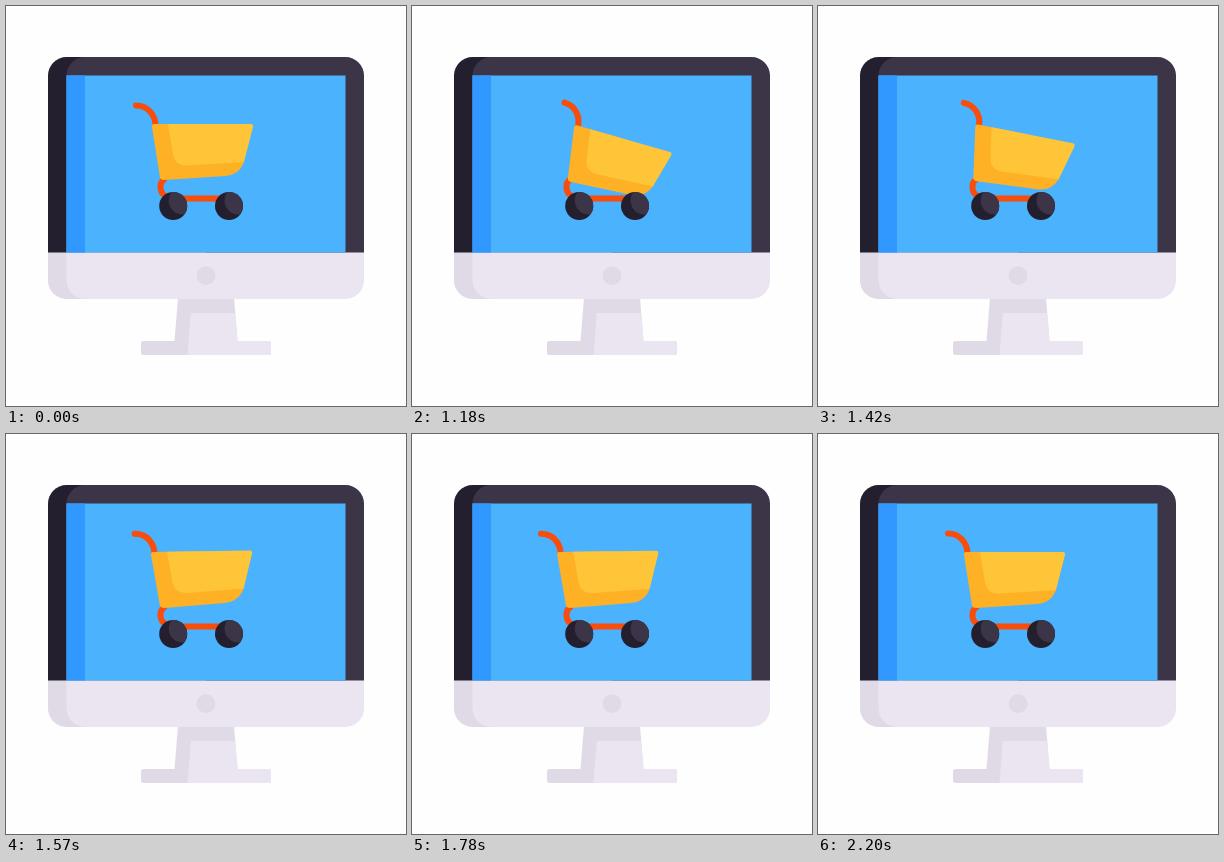
An HTML page for the animation above (2.23 s loop, 400 px wide and 400 px high).

```html
<!DOCTYPE html>
<html lang="en">
<head>
<meta charset="utf-8">
<title>Shopping cart</title>
<style>
  html, body { margin: 0; width: 100%; height: 100%; overflow: hidden; background: #fefefe; }
  svg { display: block; width: 100vw; height: 100vh; }
</style>
</head>
<body>
<svg viewBox="0 0 400 400">
  <defs>
    <clipPath id="rim"><circle r="14"/></clipPath>
    <g id="wheel">
      <circle r="14" fill="#241f2e"/>
      <circle cx="9.5" cy="-5.5" r="14" fill="#3c3548" clip-path="url(#rim)"/>
    </g>
  </defs>

  <!-- stand -->
  <path fill="#e0d9e6" d="M172 292H228L231.5 335H262.5Q265 335 265 337.5V346.500Q265 349 262.500 349H137.500Q135 349 135 346.500V337.500Q135 335 137.500 335H168.500Z"/>
  <path fill="#ebe5f1" d="M184.800 307H229.200L231.500 335H262.500Q265 335 265 337.500V346.500Q265 349 262.500 349H181.500Z"/>

  <!-- housing -->
  <path fill="#241f2e" d="M42 247V69.500A18.500 18.500 0 0 1 60.500 51H200V247Z"/>
  <path fill="#3c3548" d="M60.500 247V69.500A18.500 18.500 0 0 1 79 51H339.500A18.500 18.500 0 0 1 358 69.500V247Z"/>
  <path fill="#e0d9e6" d="M42 246.500H200V293H60.500A18.500 18.500 0 0 1 42 274.500Z"/>
  <path fill="#ebe5f1" d="M60.500 246.500H358V274.500A18.500 18.500 0 0 1 339.500 293H79A18.500 18.500 0 0 1 60.500 274.500Z"/>
  <circle cx="200" cy="269.700" r="9.400" fill="#e0d9e6"/>

  <!-- screen -->
  <path fill="#4bb2fe" d="M60.500 69.500H339.500V246.500H60.500Z"/>
  <path fill="#3198ff" d="M60.500 69.500H79V246.500H60.500Z"/>

  <!-- cart -->
  <g fill="none" stroke="#f84d0b" stroke-width="6" stroke-linecap="round">
    <path d="M158 173.500C153 177 153 187 160 190Q164 192.500 170 192.500H215"/>
  </g>
  <g id="basket">
    <path fill="none" stroke="#f84d0b" stroke-width="6" stroke-linecap="round" d="M130 99.500C142 99.500 149 109 149.500 119"/>
    <path fill="#ffb125" d="M148 118H200L238 156Q233 169 219 170L158 174Q154.500 174 154 171.500L146 121Q145.700 118 148 118Z"/>
    <path fill="#ffc539" d="M162 118H245Q247.500 118 247 121L238 156L181 159.500Q169 160 167 148.500Z"/>
  </g>
  <use href="#wheel" x="167.200" y="200"/>
  <use href="#wheel" x="223" y="200"/>
</svg>
<script>
  const LOOP = 2230, REST = 1030, STEP = 30;
  // time in ms, tilt in degrees
  const keys = [[1000, 0], [1220, 17.3], [1320, 17], [1580, -1], [2200, 0]];
  const basket = document.getElementById("basket");
  const ease = u => (1 - Math.cos(Math.PI * u)) / 2;

  function tilt(t) {
    if (t < REST) return 0;
    for (let i = 1; i < keys.length; i++) {
      const [t0, a0] = keys[i - 1], [t1, a1] = keys[i];
      if (t < t1) return a0 + (a1 - a0) * ease((t - t0) / (t1 - t0));
    }
    return 0;
  }

  function draw(now) {
    let t = now % LOOP;
    if (t >= REST) t = REST + Math.floor((t - REST) / STEP) * STEP;
    basket.setAttribute("transform", `rotate(${tilt(t).toFixed(3)} 151.5 178.5)`);
    requestAnimationFrame(draw);
  }

  const start = performance.now();
  requestAnimationFrame(function first(now) {
    draw(Math.max(0, now - start));
  });
</script>
</body>
</html>
```
